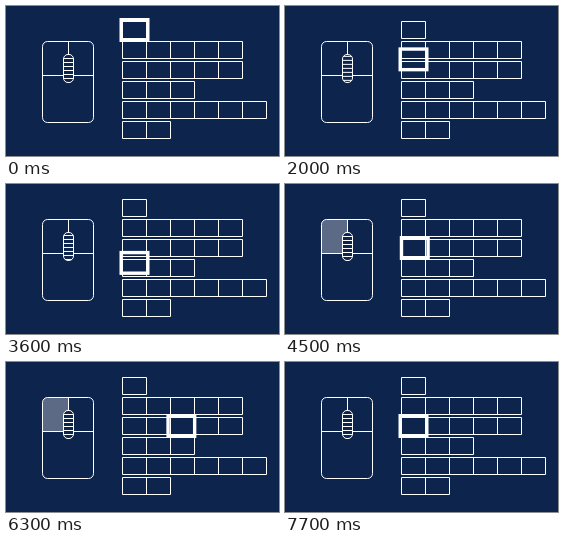
These frames come from a looping animation (273x150 px, 8 s). An HTML page:

```html
<!DOCTYPE html>
<html lang="en">
<head>
<meta charset="utf-8">
<title>Mouse navigation</title>
<style>
  html, body { margin: 0; width: 100%; height: 100%; overflow: hidden; background: #0d244d; }
  svg { display: block; width: 100%; height: 100%; }
</style>
</head>
<body>
<svg viewBox="0 0 273 150" fill="none" stroke="#fff">
  <defs>
    <clipPath id="wheelClip"><rect x="57.5" y="48.5" width="10" height="28" rx="4.5"/></clipPath>
  </defs>
  <path id="button" d="M62.5 35.5H41.5a5 5 0 0 0-5 5V69.5H62.5Z" fill="#5d6a86" stroke="none"/>
  <rect x="36.5" y="35.5" width="51" height="81" rx="5"/>
  <path d="M36.5 69.5H87.5M62.5 35.5V48.5"/>
  <rect x="57.5" y="48.5" width="10" height="28" rx="4.5" fill="#0d244d"/>
  <g clip-path="url(#wheelClip)"><path id="ridges"/></g>
  <path id="cells"/>
  <rect id="cursor" x="115.2" y="13.7" width="26.6" height="20.6" stroke-width="3.4"/>
</svg>
<script>
  const LOOP = 8000, STEP = 100, CLICK = 200;
  const CELL_W = 24, ROW_H = 20, RIDGE_GAP = 4;
  const rowSizes = [1, 5, 5, 3, 6, 2];

  // Each move shifts the cursor by whole columns and rows.
  const moves = [
    { start: 980, length: 470, rows: 1 },
    { start: 1780, length: 470, rows: 1 },
    { start: 2540, length: 470, rows: 1 },
    { start: 3480, length: 470, rows: -1 },
    { start: 4475, length: 470, cols: 1, click: 4500 },
    { start: 5270, length: 470, cols: 1, click: 5300 },
    { start: 6280, length: 420, cols: -1, click: 6300 },
    { start: 7180, length: 470, cols: -1, click: 7200 }
  ];

  const byId = id => document.getElementById(id);
  const button = byId('button'), ridges = byId('ridges'), cursor = byId('cursor');

  byId('cells').setAttribute('d', rowSizes.map((count, row) => {
    const y = 15.5 + row * ROW_H;
    let path = `M116.5 ${y}h${count * CELL_W}v17h${-count * CELL_W}Z`;
    for (let col = 1; col < count; col++) path += `M${116.5 + col * CELL_W} ${y}v17`;
    return path;
  }).join(''));

  let ridgePath = '';
  for (let y = 44.5; y < 80; y += RIDGE_GAP) ridgePath += `M57 ${y}h11`;
  ridges.setAttribute('d', ridgePath);

  function draw(time) {
    let col = 0, row = 0, pressed = false;
    for (const { start, length, cols = 0, rows = 0, click } of moves) {
      const progress = Math.min(1, Math.max(0, (time - start) / length));
      col += cols * progress;
      row += rows * progress;
      if (time >= click && time < click + CLICK) pressed = true;
    }
    cursor.setAttribute('transform', `translate(${col * CELL_W} ${row * ROW_H})`);
    ridges.setAttribute('transform', `translate(0 ${row * RIDGE_GAP % RIDGE_GAP})`);
    button.style.display = pressed ? '' : 'none';
  }

  function tick() {
    draw(Math.floor(performance.now() % LOOP / STEP) * STEP);
    requestAnimationFrame(tick);
  }
  tick();
</script>
</body>
</html>
```
